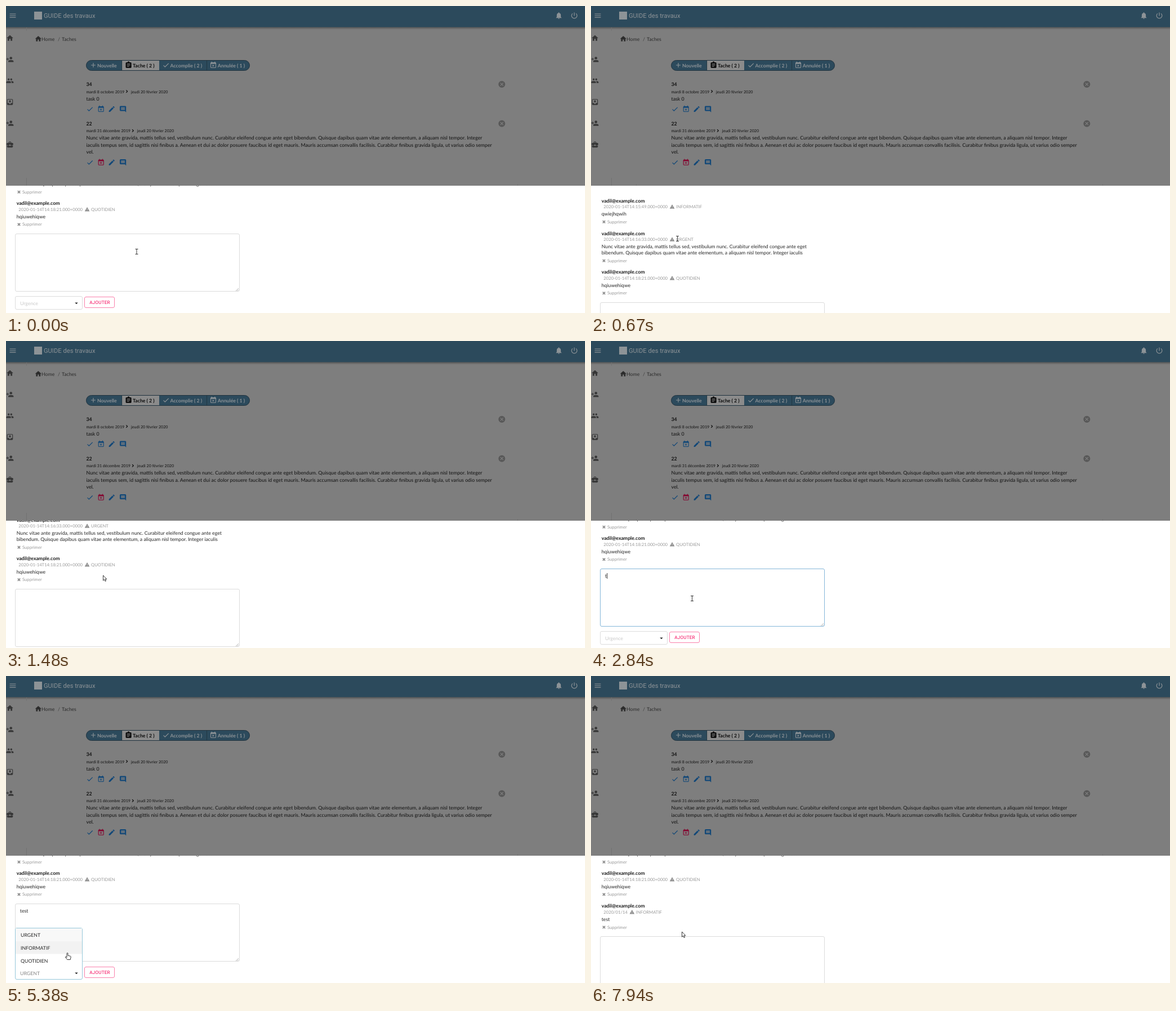
Write an HTML page with a canvas that moves like this. It is 1028 px wide and 545 px high and loops after 8 s.

```html
<!DOCTYPE html>
<html lang="fr">
<head>
<meta charset="utf-8">
<title>Taches</title>
<style>
html, body { margin: 0; width: 100%; height: 100%; overflow: hidden; background: #fff; }
canvas { display: block; }
</style>
</head>
<body>
<canvas id="stage" width="1028" height="545"></canvas>
<script>
const ctx = document.getElementById('stage').getContext('2d');
const LOOP = 8000, PANEL_TOP = 319, SIZE = 8.72, TASK_SIZE = 8.79, SMALL = 7.68;
const DARK = '#262626', GREY = '#999', BLUE = '#124878', RED = '#85052f', BAR = '#2c4a5c';
const PALE = '#8d9397', PINK = '#f50057', FOCUS = '#85b7d9', BORDER = '#dcdcdc', EDGE = '#20323e';
const AUTHOR = 'vadil@example.com';

// Icons on a 24 unit grid, filled even-odd
const icons = {
  menu: 'M3 6h18v2H3zM3 11h18v2H3zM3 16h18v2H3z',
  home: 'M10 20v-6h4v6h5v-8h3L12 3 2 12h3v8z',
  personAdd: 'M11 8a4 4 0 1 1 8 0a4 4 0 1 1-8 0M1 10h3V7h2v3h3v2H6v3H4v-3H1zM7 20v-2q0-4 8-4t8 4v2z',
  group: 'M5 8a3 3 0 1 1 6 0a3 3 0 1 1-6 0M13 8a3 3 0 1 1 6 0a3 3 0 1 1-6 0M1 19v-2.5q0-3.5 7-3.5t7 3.5V19zM15 13q8-.3 8 3.5V19h-6v-2.5q0-2-2-3.5z',
  inbox: 'M5 3h14l2 2v14l-2 2H5l-2-2V5zM5 5v10h4a3 3 0 0 0 6 0h4V5zM10 7h4v3h2l-4 4-4-4h2z',
  briefcase: 'M3 15h7v1h4v-1h7v4l-2 2H5l-2-2zM2 9l2-2h4V5l2-2h4l2 2v2h4l2 2v3l-2 2h-6v-2h-4v2H4l-2-2zM10 5v2h4V5z',
  bell: 'M10 20h4a2 2 0 0 1-4 0M4 19v-1l2-2v-5q0-5 4.5-6.3V4a1.5 1.5 0 0 1 3 0v.7Q18 6 18 11v5l2 2v1z',
  power: 'M11 3h2v10h-2zM6.2 5.2l1.4 1.4a7 7 0 1 0 8.8 0l1.4-1.4a9 9 0 1 1-11.6 0z',
  add: 'M5 11h6V5h2v6h6v2h-6v6h-2v-6H5z',
  clipboard: 'M5 3h4a3 3 0 0 1 6 0h4l2 2v14l-2 2H5l-2-2V5zM7 7h10v2H7zM7 11h10v2H7zM7 15h7v2H7z',
  check: 'M9 16.2L4.8 12l-1.4 1.4L9 19 21 7l-1.4-1.4z',
  calendar: 'M5 3h1V1h2v2h8V1h2v2h1l2 2v14l-2 2H5l-2-2V5zM5 8v11h14V8zM8.3 11l1-1 2.5 2.5 2.4-2.5 1 1-2.4 2.5 2.4 2.4-1 1-2.4-2.4-2.5 2.4-1-1 2.4-2.4z',
  edit: 'M3 17.2V21h3.8L17.8 9.9l-3.7-3.7zM20.7 7q.6-.7 0-1.4l-2.3-2.3q-.7-.6-1.4 0l-1.9 1.8 3.8 3.8z',
  comment: 'M4 2h16l2 2v18l-4-4H4l-2-2V4zM6 6h12v2H6zM6 9h12v2H6zM6 12h12v2H6z',
  warning: 'M1 21L12 2l11 19zM11 10h2v4h-2zM11 16h2v2h-2z',
  cancel: 'M2 12a10 10 0 1 1 20 0a10 10 0 1 1-20 0M7 8.4L8.4 7l3.6 3.6L15.6 7 17 8.4 13.4 12l3.6 3.6-1.4 1.4-3.6-3.6L8.4 17 7 15.6l3.6-3.6z',
  chevron: 'M10 5L8 7l5 5-5 5 2 2 7-7z',
  cross: 'M5 8l3-3 4 4 4-4 3 3-4 4 4 4-3 3-4-4-4 4-3-3 4-4z',
};
for (const name in icons) icons[name] = new Path2D(icons[name]);

const arrowShape = new Path2D('M0 0v9.2l2.1-1.9 1.5 3.3 1.5-.7-1.5-3.1h2.8z');
const handShape = new Path2D('M-1 .8q1-1.6 2 0v4l4.4 1q1 .5.8 1.6l-1 4.6h-5.4l-3.6-4.6q.6-1.4 2.8.6z');

// Bursts of change: first step, last step, number of steps
const bursts = [[280, 1030, 9], [1210, 1750, 7], [1930, 2190, 4], [2380, 2380, 1], [2840, 2930, 2],
  [3120, 3120, 1], [3390, 3490, 2], [3760, 3940, 3], [4310, 4760, 6], [4940, 5380, 6],
  [5660, 5750, 2], [6030, 6750, 9], [6840, 7020, 3], [7580, 7940, 5]];

const scrollKeys = [[0, 0], [190, 0], [655, 122], [1120, 122], [1480, 36], [1660, 0]];
const pointerKeys = [[0, 232, 436], [190, 232, 436], [655, 153.5, 413], [1120, 153.5, 413],
  [1480, 172.5, 416], [1840, 174, 420], [2190, 179.5, 457], [3670, 179.5, 457], [3940, 190, 483],
  [4220, 190, 483], [4670, 128, 528], [4850, 128, 528], [5380, 109, 491.5], [5940, 109, 491.5],
  [6660, 161, 523.5], [7490, 161, 523.5], [7760, 188, 490], [7940, 161.5, 454]];

const comments = [
  { y: 223.7, date: '2020-01-14T14:15:49.000+0000', level: 'INFORMATIF', lines: ['qwiejhqwih'] },
  { y: 281.7, date: '2020-01-14T14:16:33.000+0000', level: 'URGENT', lines: [
    'Nunc vitae ante gravida, mattis tellus sed, vestibulum nunc. Curabitur eleifend congue ante eget',
    'bibendum. Quisque dapibus quam vitae ante elementum, a aliquam nisl tempor. Integer iaculis'] },
  { y: 350.3, date: '2020-01-14T14:18:21.000+0000', level: 'QUOTIDIEN', lines: ['hqiuwehiqwe'] },
];
const newComment = { y: 408.4, date: '2020/01/14', level: 'INFORMATIF', lines: ['test'] };

function snap(t) {
  const burst = bursts.filter(b => b[0] <= t).pop();
  if (!burst) return 0;
  const [first, last, count] = burst;
  const gap = count > 1 ? (last - first) / (count - 1) : 1;
  return first + gap * Math.min(count - 1, Math.floor((t - first) / gap + 0.2));
}

function along(keys, t) {
  const next = keys.findIndex(k => k[0] > t);
  if (next < 0) return keys[keys.length - 1].slice(1);
  const a = keys[next - 1], b = keys[next], f = (t - a[0]) / (b[0] - a[0]);
  return a.slice(1).map((v, i) => v + (b[i + 1] - v) * f);
}

function text(str, x, y, { size = SIZE, color = DARK, weight = 400, family = 'Lato' } = {}) {
  ctx.font = `${weight} ${size}px ${family}, sans-serif`;
  ctx.fillStyle = color;
  ctx.fillText(str, x, y + size * 0.35);
  return x + ctx.measureText(str).width;
}

function icon(name, x, y, size, color) {
  ctx.save();
  ctx.translate(x - size / 2, y - size / 2);
  ctx.scale(size / 24, size / 24);
  ctx.fillStyle = color;
  ctx.fill(icons[name], 'evenodd');
  ctx.restore();
}

function rect(x, y, w, h, color) {
  ctx.fillStyle = color;
  ctx.fillRect(x, y, w, h);
}

function box(x, y, w, h, radius, fill, stroke) {
  ctx.beginPath();
  ctx.roundRect(x, y, w, h, radius);
  if (fill) { ctx.fillStyle = fill; ctx.fill(); }
  if (stroke) { ctx.strokeStyle = stroke; ctx.lineWidth = 1; ctx.stroke(); }
}

function task(y, number, from, fromEnd, lines, calendarColor) {
  text(number, 142.5, y, { weight: 700, color: '#111' });
  text(from, 142.5, y + 13.2, { size: 7.1, color: '#111' });
  icon('chevron', fromEnd + 4.5, y + 12.6, 9, '#000');
  text('jeudi 20 février 2020', fromEnd + 12, y + 13.2, { size: 7.1, color: '#111' });
  lines.forEach((line, i) => text(line, 142.5, y + 25.5 + i * 12.35, { size: TASK_SIZE, color: '#111' }));
  const row = y + 44 + (lines.length - 1) * 12.5;
  icon('check', 149, row, 13.5, BLUE);
  icon('calendar', 168.7, row, 13.5, calendarColor);
  icon('edit', 187.7, row, 13.5, BLUE);
  icon('comment', 207.6, row, 13.5, BLUE);
  icon('cancel', 880.3, y, 14.4, '#585858');
}

function drawPage() {
  rect(0, 0, 1028, 545, '#7e7e7e');
  const shade = ctx.createLinearGradient(0, 37, 0, 42);
  shade.addColorStop(0, 'rgba(0,0,0,.35)');
  shade.addColorStop(1, 'rgba(0,0,0,0)');
  rect(0, 37, 1028, 5, shade);
  rect(0, 0, 1028, 37.5, BAR);
  icon('menu', 12, 17, 14.5, PALE);
  rect(50, 10, 14, 14, PALE);
  text('GUIDE des travaux', 67, 17.3, { size: 11.2, color: PALE, family: 'Roboto' });
  icon('bell', 981.5, 17, 14.5, PALE);
  icon('power', 1009, 17, 14.5, PALE);

  rect(36, 38, 1, 6, '#717171');
  rect(36, 305, 1, 14, '#717171');
  rect(80, 316, 1, 3, '#747474');
  rect(908, 316, 1, 3, '#747474');
  ['home', 'personAdd', 'group', 'inbox', 'personAdd', 'briefcase']
    .forEach((name, i) => icon(name, 7, 57 + i * 37.8, 14, '#363636'));

  icon('home', 57.3, 58.3, 13.5, '#2c2c2c');
  text('Home', 63, 58.5, { color: '#2c2c2c' });
  text('/', 92, 58.5, { color: '#3c3c3c' });
  text('Taches', 99, 58.5, { color: '#2c2c2c' });

  box(142.5, 96.5, 290, 18, 9, BAR, EDGE);
  rect(206, 97, 66, 17, '#8b8b8b');
  rect(205.3, 97, 0.8, 17, EDGE);
  rect(356, 97, 0.8, 17, EDGE);
  const tab = (name, iconX, label, x, color) => {
    icon(name, iconX, 105, 13.5, color);
    text(label, x, 105.5, { weight: 700, color });
  };
  tab('add', 155, 'Nouvelle', 162, PALE);
  tab('clipboard', 217.6, 'Tache ( 2 )', 225, '#0c0c0c');
  tab('check', 284, 'Accomplie ( 2 )', 291.5, PALE);
  tab('calendar', 368, 'Annulée ( 1 )', 375.7, PALE);

  task(139, '34', 'mardi 8 octobre 2019', 210, ['task 0'], BLUE);
  task(208.7, '22', 'mardi 31 décembre 2019', 220.7, [
    'Nunc vitae ante gravida, mattis tellus sed, vestibulum nunc. Curabitur eleifend congue ante eget bibendum. Quisque dapibus quam vitae ante elementum, a aliquam nisl tempor. Integer',
    'iaculis tempus sem, id sagittis nisi finibus a. Aenean et dui ac dolor posuere faucibus id eget mauris. Mauris accumsan convallis facilisis. Curabitur finibus gravida ligula, ut varius odio semper',
    'vel.'], RED);
}

function drawComment({ y, date, level, lines }) {
  text(AUTHOR, 18.7, y, { weight: 700, color: '#1c1c1c' });
  const end = text(date, 22.3, y + 11, { size: SMALL, color: GREY });
  icon('warning', end + 8, y + 10.6, 9.5, '#8c8c8c');
  text(level, end + 15, y + 11, { size: SMALL, color: GREY });
  lines.forEach((line, i) => text(line, 18.7, y + 23.2 + i * 11.2));
  const foot = y + 37.5 + (lines.length - 1) * 11;
  icon('cross', 23, foot, 9.5, '#8c8c8c');
  text('Supprimer', 29, foot, { size: SMALL, color: GREY });
}

function drawTextarea(y, value, focused, caret) {
  box(16.5, y + 0.5, 398, 102, 2.5, '#fff', focused ? FOCUS : BORDER);
  const end = text(value, 24.8, y + 13);
  if (caret) rect(end + 0.3, y + 8, 0.9, 10, '#222');
  ctx.strokeStyle = '#999';
  ctx.lineWidth = 0.7;
  ctx.beginPath();
  for (const d of [2.5, 5]) {
    ctx.moveTo(413 - d, y + 102);
    ctx.lineTo(413, y + 102 - d);
  }
  ctx.stroke();
}

function drawSelect(y, value, color, open, hoverY) {
  box(16.5, open ? 447.5 : y + 111.5, 119, open ? 91 : 23, 2.5, '#fff', open ? '#96c8da' : BORDER);
  if (open) ['URGENT', 'INFORMATIF', 'QUOTIDIEN'].forEach((label, i) => {
    const top = 448 + i * 22.7;
    const hovered = hoverY >= top && hoverY < top + 22.7;
    if (hovered || i === 0) rect(17, top, 118, 22.7, hovered ? '#f2f2f2' : '#f8f8f8');
    text(label, 26, top + 12.2);
  });
  text(value, 25, y + 123.6, { color });
  ctx.fillStyle = '#222';
  ctx.beginPath();
  ctx.moveTo(122.3, y + 122.4);
  ctx.lineTo(127.7, y + 122.4);
  ctx.lineTo(125, y + 125.2);
  ctx.fill();
}

function drawButton(y, hovered) {
  box(139.5, y + 112.5, 53, 19, 2.5, hovered ? '#feebf2' : '#fff', hovered ? PINK : '#fa80ab');
  ctx.letterSpacing = '0.2px';
  text('AJOUTER', 148.3, y + 122, { size: 8.1, color: PINK, family: 'Roboto' });
  ctx.letterSpacing = '0px';
}

function drawPointer(kind, x, y) {
  ctx.save();
  ctx.translate(x, y);
  ctx.strokeStyle = '#222';
  ctx.lineWidth = 0.9;
  if (kind === 'text') {
    ctx.beginPath();
    for (const s of [-1, 1]) {
      ctx.moveTo(-2.5, 4.5 * s);
      ctx.lineTo(2.5, 4.5 * s);
    }
    ctx.moveTo(0, -4.5);
    ctx.lineTo(0, 4.5);
    ctx.stroke();
  } else {
    const shape = kind === 'hand' ? handShape : arrowShape;
    ctx.fillStyle = '#fff';
    ctx.fill(shape);
    ctx.stroke(shape);
  }
  ctx.restore();
}

function pointerKind(x, y, formY, scroll, open) {
  const within = (l, t, r, b) => x >= l && x <= r && y >= t && y <= b;
  if (open && within(16, 447, 136, 539)) return 'hand';
  if (within(16, formY, 415, formY + 103) || scroll > 60) return 'text';
  const overControl = within(16, formY + 111, 136, formY + 135) || within(139, formY + 111, 193, formY + 133);
  return overControl ? 'hand' : 'arrow';
}

function render(time) {
  const t = snap(time);
  const scroll = Math.round(along(scrollKeys, t)[0]);
  const [x, y] = along(pointerKeys, t);
  const added = t >= 6930;
  const open = t >= 4670 && t < 6030;
  const formY = 404 + scroll + (added ? 58 : 0);
  const typed = added ? '' : 'test'.slice(0, [2840, 2930, 3120, 3390].filter(k => k <= t).length);
  const focused = t >= 1930 && t < 4670;
  const caret = (t >= 1930 && t < 2380) || (t >= 2840 && t < 3760);
  const value = t < 4940 || added ? 'Urgence' : t < 5660 ? 'URGENT' : 'INFORMATIF';
  const valueColor = value === 'Urgence' ? '#c9c9c9' : open ? '#858585' : DARK;
  const kind = pointerKind(x, y, formY, scroll, open);

  drawPage();
  rect(0, PANEL_TOP, 1028, 545 - PANEL_TOP, '#fff');
  ctx.save();
  ctx.beginPath();
  ctx.rect(0, PANEL_TOP, 1028, 545 - PANEL_TOP);
  ctx.clip();
  for (const c of added ? [...comments, newComment] : comments) drawComment({ ...c, y: c.y + scroll });
  drawTextarea(formY, typed, focused, caret);
  drawSelect(formY, value, valueColor, open, y);
  drawButton(formY, kind === 'hand' && x > 139);
  drawPointer(kind, x, y);
  ctx.restore();
}

ctx.textRendering = 'geometricPrecision';
const start = performance.now();
function frame() {
  render((performance.now() - start) % LOOP);
  requestAnimationFrame(frame);
}
frame();
</script>
</body>
</html>
```
